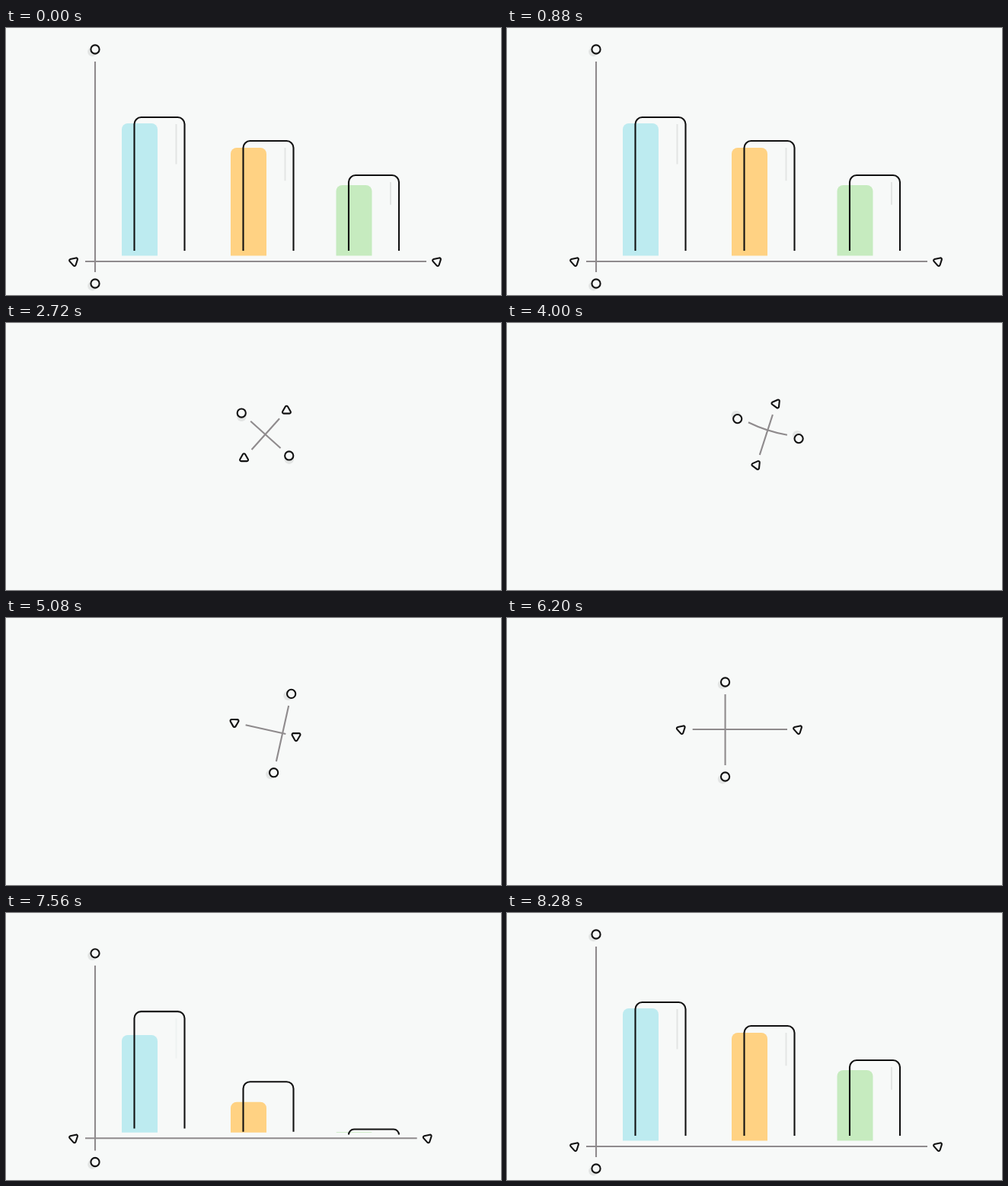
These frames come from a looping animation (650x350 px, 8.32 s). An HTML page with a canvas:

```html
<!DOCTYPE html>
<html lang="en">
<head>
<meta charset="utf-8">
<title>Chart loop</title>
<style>
  html, body { margin: 0; width: 100%; height: 100%; overflow: hidden; background: #f7f9f8; }
  canvas { display: block; }
</style>
</head>
<body>
<canvas id="stage" width="650" height="350"></canvas>
<script>
const ctx = document.getElementById('stage').getContext('2d');
const LOOP = 8320, STEP = 40;
const PAPER = '#f7f9f8', INK = '#111', AXIS = '#8f8b8d', SHADE = '#e3e5e4';
const BLUE = '#bdebf0', YELLOW = '#ffd283', GREEN = '#c6ebbf';
const MID = [340.5, 146], BASE = 292, FILL_BASE = 298.5;
const FOLD = 920, SHAPES = 1500, CROSS = 2440, UNFOLD = 6960;

const lerp = (a, b, k) => a + (b - a) * k;
const part = (t, from, to) => Math.min(1, Math.max(0, (t - from) / (to - from)));
const ramp = (t, from, to) => 0.5 - Math.cos(Math.PI * part(t, from, to)) / 2;
const bump = (t, from, to) => Math.sin(Math.PI * part(t, from, to)) ** 2;
const rad = deg => deg * Math.PI / 180;
const polar = ([x, y], deg, r) => [x + r * Math.cos(rad(deg)), y + r * Math.sin(rad(deg))];

// Arm lengths, rotation and bend of the two axes.
function axes(t) {
  if (t < SHAPES) {
    const chart = axes(LOOP), open = 1 - ramp(t, FOLD, 1400);
    for (const arm of ['right', 'left', 'top', 'bottom']) chart[arm] *= open;
    chart.size = 1 - ramp(t, 1050, 1400);
    return chart;
  }
  const grow = ramp(t, 2040, 2520), rise = ramp(t, UNFOLD, 7680);
  const spin = 41.5 * grow + 14 * bump(t, 2640, 4110);
  const upright = spin + 20.5 * ramp(t, 4480, 5600);
  return {
    cy: MID[1] + 160 * rise,
    angle: -134 - 576 * ramp(t, 2640, 4110) - 100 * ramp(t, 4480, 5260),
    right: spin + 184 * rise,
    left: spin + 210 * ramp(t, 5760, 6880),
    top: upright + 160 * rise + 56 * ramp(t, UNFOLD, 8080),
    bottom: upright - 33 * rise,
    slide: 24 * ramp(t, 4480, 5160) - 247.5 * ramp(t, 5760, 6920) - 8 * bump(t, 3600, 4320),
    sag: 2 * bump(t, 3700, 4240) - 4.5 * bump(t, 6400, 7500),
    size: ramp(t, 2040, CROSS)
  };
}

function paint(fill, stroke, width = 2.1) {
  if (fill) { ctx.fillStyle = fill; ctx.fill(); }
  if (stroke) { ctx.strokeStyle = stroke; ctx.lineWidth = width; ctx.stroke(); }
}

function circle([x, y], r) {
  ctx.beginPath();
  ctx.arc(x, y, Math.max(0, r), 0, 7);
}

function roundPoly(points, r) {
  const n = points.length;
  const half = (a, b) => [(a[0] + b[0]) / 2, (a[1] + b[1]) / 2];
  ctx.beginPath();
  ctx.moveTo(...half(points[n - 1], points[0]));
  points.forEach((p, i) => {
    const next = half(p, points[(i + 1) % n]);
    ctx.arcTo(...p, ...next, r);
    ctx.lineTo(...next);
  });
  ctx.closePath();
}

const triangle = (at, deg, R) =>
  roundPoly([0, 120, 240].map(turn => polar(at, deg + turn, R)), R * 0.225);

function line(a, b, bend = [0, 0]) {
  ctx.beginPath();
  ctx.moveTo(...a);
  ctx.quadraticCurveTo((a[0] + b[0]) / 2 + bend[0], (a[1] + b[1]) / 2 + bend[1], ...b);
  paint(null, AXIS);
}

function smallCircle(at, angle, k) {
  circle(polar(at, angle + 228, 4.8 * k), 6.2 * k);
  paint(SHADE);
  circle(at, 5.6 * k);
  paint(PAPER, INK, 2.1 * k);
}

function smallTriangle(at, angle, k) {
  triangle(at, angle + 48, 7.8 * k);
  paint(PAPER, INK, 2.1 * k);
}

function drawAxes(t) {
  const { cy, angle, right, left, top, bottom, slide, sag, size } = axes(t);
  if (size <= 0) return;
  const across = angle + 90, center = [MID[0], cy];
  const hub = polar(center, across, slide), gap = 15;
  if (right + left > 2 * gap) {
    line(polar(center, across, right - gap + 1), polar(center, across, gap - left));
  }
  if (top + bottom > 2 * gap) {
    line(polar(hub, angle, top - gap - 1), polar(hub, angle, gap - bottom), polar([0, 0], across, 2 * sag));
  }
  smallTriangle(polar(center, across, right), angle, size);
  smallCircle(polar(hub, angle, -bottom), angle, size);
  // While the large shapes are shrinking they stand in for these two ends.
  if (t < SHAPES || t >= CROSS) {
    smallTriangle(polar(center, across, -left), angle, size);
    smallCircle(polar(hub, angle, top), angle, size);
  }
}

const bars = [
  { color: BLUE, x: 168.5, top: 117, drop: 8 },
  { color: YELLOW, x: 311.5, top: 148, drop: 9 },
  { color: GREEN, x: 450, top: 193, drop: 13 }
];
const outlineBox = ({ x, top }) => [x, top, 66, BASE - top];
const fillBox = ({ x, top, drop }) => [x - 16.5, top + drop, 47, FILL_BASE - top - drop];

function drawBar(bar, cy, grow, fillGrow) {
  const [fillX, , fillW, fillH] = fillBox(bar), [x, , w, fullH] = outlineBox(bar);
  if (fillGrow > 0) {
    const h = fillH * fillGrow, r = Math.min(8, h);
    ctx.beginPath();
    ctx.roundRect(fillX, cy - 7.5 - h, fillW, h, [r, r, 0, 0]);
    paint(bar.color);
  }
  if (grow <= 0) return;
  const base = cy - lerp(4, 14, grow), h = fullH * grow, r = Math.min(9, h);
  const right = x + w, y = base - h;
  ctx.globalAlpha = Math.max(0, grow * 5 - 4);
  ctx.fillStyle = SHADE;
  ctx.fillRect(right - 12, y + 9, 2, fullH * 0.3);
  ctx.globalAlpha = 1;
  ctx.beginPath();
  ctx.moveTo(x, base);
  ctx.arcTo(x, y, right, y, r);
  ctx.arcTo(right, y, right, base, r);
  ctx.lineTo(right, base);
  paint(null, INK);
}

function barToTriangle([x, y, w, h], at, R, k) {
  if (k >= 1) return triangle(at, -90, R);
  const tip = polar(at, -90, R * 0.85);
  const goal = [[tip[0] - 3, tip[1]], [tip[0] + 3, tip[1]], polar(at, 30, R), polar(at, 150, R)];
  const from = [[x, y], [x + w, y], [x + w, y + h], [x, y + h]];
  roundPoly(from.map((p, i) => [lerp(p[0], goal[i][0], k), lerp(p[1], goal[i][1], k)]), lerp(8, 4, k));
}

function barToCircle([x, y, w, h], at, R, k) {
  ctx.beginPath();
  ctx.roundRect(lerp(x, at[0] - R, k), lerp(y, at[1] - R, k),
    lerp(w, 2 * R, k), lerp(h, 2 * R, k), lerp(8, R, k));
}

// Places of the large shapes: they orbit inwards as k goes from 0 to 1.
function shapePlaces(k) {
  const full = 1 - k;
  const tri = polar(MID, lerp(-135, -224, k), lerp(50, 41.5, k));
  const disc = polar(MID, lerp(45, -134, k), lerp(53, 41.5, k));
  return {
    tri, disc,
    triFill: [tri[0] - 9 * full, tri[1] + 6.3 * full],
    discFill: [disc[0] - 2 * full, disc[1] + 10.8 * full]
  };
}

function drawMorph(t) {
  const k = ramp(t, FOLD, 1440), at = shapePlaces(0);
  const [, yellow, green] = bars;
  barToTriangle(fillBox(yellow), at.triFill, 26, k);
  paint(YELLOW);
  barToTriangle(outlineBox(yellow), at.tri, 26.7, k);
  paint(null, INK);
  barToCircle(fillBox(green), at.discFill, 19.3, k);
  paint(GREEN);
  barToCircle(outlineBox(green), at.disc, 19.8, k);
  paint(null, INK);
}

function drawOrbit(t) {
  const k = ramp(t, 1700, CROSS), at = shapePlaces(k);
  triangle(at.triFill, -90, 26 * (1 - k));
  paint(YELLOW);
  triangle(at.tri, lerp(-90, -86, k), lerp(26.7, 7.8, k));
  paint(null, INK);
  circle(at.discFill, 19.3 * (1 - k));
  paint(GREEN);
  circle(at.disc, lerp(19.8, 5.6, k));
  paint(null, INK);
}

function draw(t) {
  ctx.fillStyle = PAPER;
  ctx.fillRect(0, 0, 650, 350);
  const { cy } = axes(t);
  if (t <= FOLD) {
    bars.forEach(bar => drawBar(bar, cy, 1, 1));
  } else if (t < SHAPES) {
    const shrink = 1 - ramp(t, FOLD, 1260);
    drawBar(bars[0], cy, shrink, shrink);
    drawMorph(t);
  } else if (t >= UNFOLD) {
    bars.forEach((bar, i) => {
      const late = t - 7020 - 210 * i;
      drawBar(bar, cy, ramp(late, 0, 700), ramp(late, 80, 780));
    });
  }
  drawAxes(t);
  if (t >= SHAPES && t < CROSS) drawOrbit(t);
}

const began = performance.now();
function frame() {
  const t = (performance.now() - began) % LOOP;
  draw(Math.floor(t / STEP) * STEP);
  requestAnimationFrame(frame);
}
frame();
</script>
</body>
</html>
```
